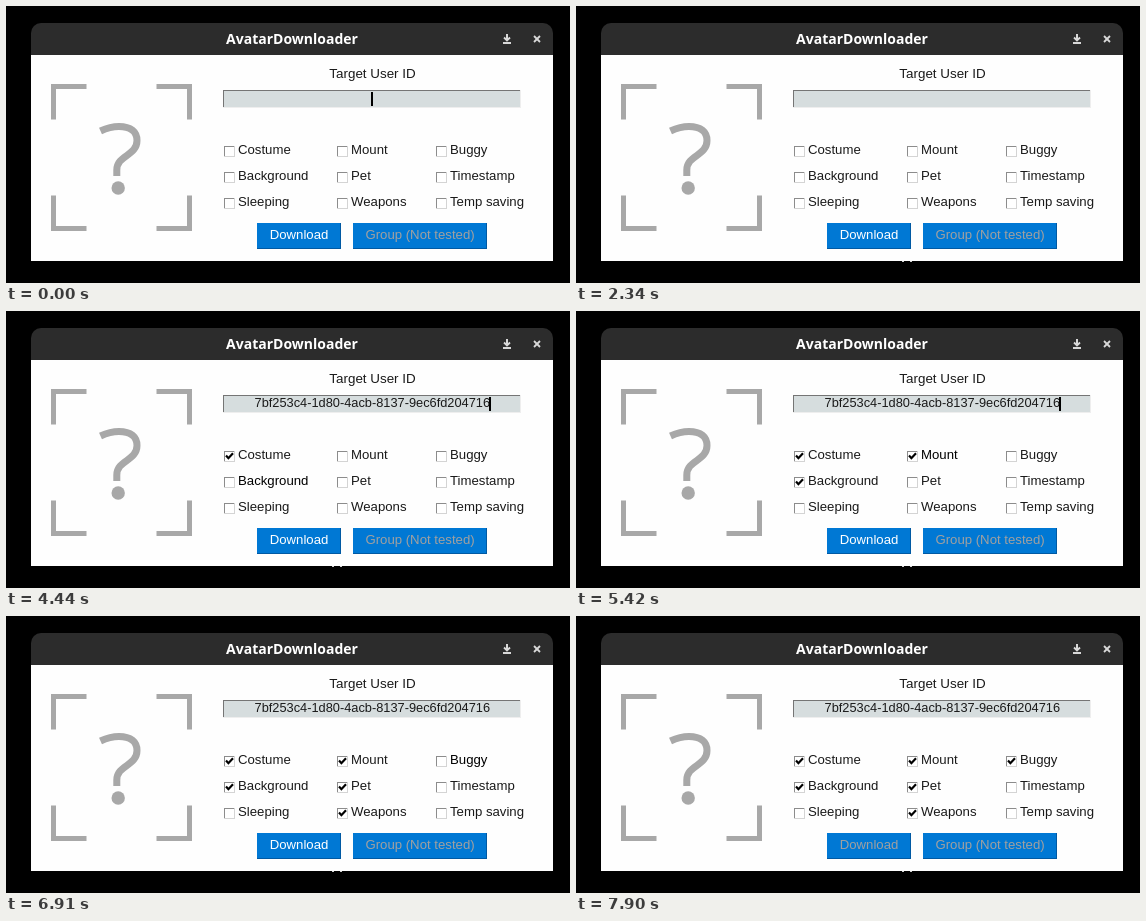
Write an HTML page with a canvas that moves like this. It is 564 by 277 pixels and loops after 8000 ms.

```html
<!DOCTYPE html>
<html lang="en">
<head>
<meta charset="utf-8">
<title>AvatarDownloader</title>
<style>
  html, body { margin: 0; width: 100%; height: 100%; overflow: hidden; background: #000; }
  canvas { display: block; }
</style>
</head>
<body>
<canvas id="stage" width="564" height="277"></canvas>
<script>
const ctx = document.getElementById('stage').getContext('2d');
const LOOP = 8000;
const SANS = '"Liberation Sans", Arial, sans-serif';
const USER_ID = '7bf253c4-1d80-4acb-8137-9ec6fd204716';
const PASTE = 2760;
const COLS = [218, 331, 430];
const PAPER = '#fefefe', INK = '#1a1a1a', GREY = '#a8a8a8';

const options = [
  ['Costume', 4150], ['Mount', 5420], ['Buggy', 7080],
  ['Background', 4680], ['Pet', 5860], ['Timestamp'],
  ['Sleeping'], ['Weapons', 6290], ['Temp saving']
];

// Times at which the pointer enters another widget.
const hovers = [
  [0, ''], [3510, 'Mount'], [3590, ''], [3780, 'Costume'], [4300, ''],
  [4360, 'Background'], [4900, 'Sleeping'], [5000, ''], [5130, 'Pet'],
  [5250, 'Mount'], [5570, ''], [5610, 'Pet'], [5990, ''], [6070, 'Weapons'],
  [6610, ''], [6690, 'Timestamp'], [6780, 'Buggy'], [7200, 'Pet'],
  [7290, 'Weapons'], [7360, ''], [7590, 'Download'], [7800, '']
];

function hoverAt(t) {
  let name = '';
  for (const [start, widget] of hovers) if (t >= start) name = widget;
  return name;
}

function rect(x, y, w, h, color) {
  ctx.fillStyle = color;
  ctx.fillRect(x, y, w, h);
}

function text(str, x, y, size, color, align = 'left', font = SANS, weight = 'normal') {
  ctx.font = `${weight} ${size}px ${font}`;
  ctx.textAlign = align;
  ctx.fillStyle = color;
  ctx.fillText(str, x, y);
}

function line(points, width, color) {
  ctx.beginPath();
  points.forEach(([x, y], i) => i ? ctx.lineTo(x, y) : ctx.moveTo(x, y));
  ctx.lineWidth = width;
  ctx.strokeStyle = color;
  ctx.stroke();
}

function sunken(x, y, w, h, fill, dark, light) {
  rect(x, y, w, h, light);
  rect(x, y, w - 1, h - 1, dark);
  rect(x + 1, y + 1, w - 2, h - 2, fill);
}

function drawWindow() {
  rect(0, 0, 564, 277, '#000');
  ctx.beginPath();
  ctx.roundRect(25, 17, 522, 32, [10, 10, 0, 0]);
  ctx.fillStyle = '#2c2c2c';
  ctx.fill();
  rect(25, 49, 522, 206, PAPER);
  text('AvatarDownloader', 286, 38, 14, '#fff', 'center', '"Noto Sans", sans-serif', 'bold');

  const icon = '#d8d8d8';
  line([[501, 28], [501, 34]], 2, icon);
  line([[498, 31.5], [501, 34.5], [504, 31.5]], 1.8, icon);
  line([[497, 37], [505, 37]], 2, icon);
  line([[528, 30], [534, 36]], 1.8, icon);
  line([[534, 30], [528, 36]], 1.8, icon);
}

function drawPlaceholder() {
  for (const [x, dx] of [[47.5, 33], [183.5, -33]]) {
    for (const [y, dy] of [[80.5, 33], [222.5, -33]]) {
      line([[x + dx, y], [x, y], [x, y + dy]], 5, GREY);
    }
  }
  ctx.beginPath();
  ctx.moveTo(94.5, 125);
  ctx.bezierCurveTo(101, 122, 107, 120.5, 113, 120.5);
  ctx.bezierCurveTo(125, 120.5, 131, 126, 131, 134.5);
  ctx.bezierCurveTo(131, 150, 110.8, 149, 110.8, 164);
  ctx.lineTo(110.8, 170);
  ctx.lineWidth = 7;
  ctx.strokeStyle = GREY;
  ctx.stroke();
  ctx.beginPath();
  ctx.arc(112.2, 182, 6.7, 0, 2 * Math.PI);
  ctx.fillStyle = GREY;
  ctx.fill();
}

function drawEntry(t) {
  text('Target User ID', 366.5, 72, 13.4, INK, 'center');
  sunken(217, 84, 298, 18, '#d6ddde', '#757575', '#eeeeee');
  const pasted = t >= PASTE;
  if (pasted) text(USER_ID, 366.3, 96, 12.8, INK, 'center');
  // Caret: 600 ms on, 300 ms off.
  if ((t + 60) % 900 < 600) rect(pasted ? 483 : 365, 86, 2, 14, '#000');
}

function drawOption([name, checkedAt], i, t, hover) {
  const x = COLS[i % 3], y = 140 + 26 * Math.floor(i / 3);
  sunken(x, y, 11, 11, '#fff', '#8c8c8c', '#d4d4d4');
  if (t >= checkedAt) {
    line([[x + 2, y + 4.5], [x + 4.4, y + 7.2], [x + 9, y + 2.2]], 2.2, '#000');
  }
  text(name, x + 14, y + 8, 13.2, hover === name ? '#000' : INK);
}

function drawButton(label, x, w, active, enabled) {
  rect(x, 217, w, 26, '#0059a3');
  rect(x, 217, w - 1, 25, active ? '#1484e0' : '#0078d4');
  text(label, x + w / 2, 233, 13.2, enabled ? '#fff' : '#a0a0a0', 'center');
}

function draw(now) {
  const t = now % LOOP;
  const hover = hoverAt(t);
  drawWindow();
  drawPlaceholder();
  drawEntry(t);
  options.forEach((option, i) => drawOption(option, i, t, hover));
  drawButton('Download', 251, 84, hover === 'Download', t < 7820);
  drawButton('Group (Not tested)', 347, 134, false, false);
  if (t >= 200) {
    rect(326, 255, 2, 1, '#d0d0d0');
    rect(334, 255, 2, 1, '#d0d0d0');
  }
  requestAnimationFrame(draw);
}
requestAnimationFrame(draw);
</script>
</body>
</html>
```
